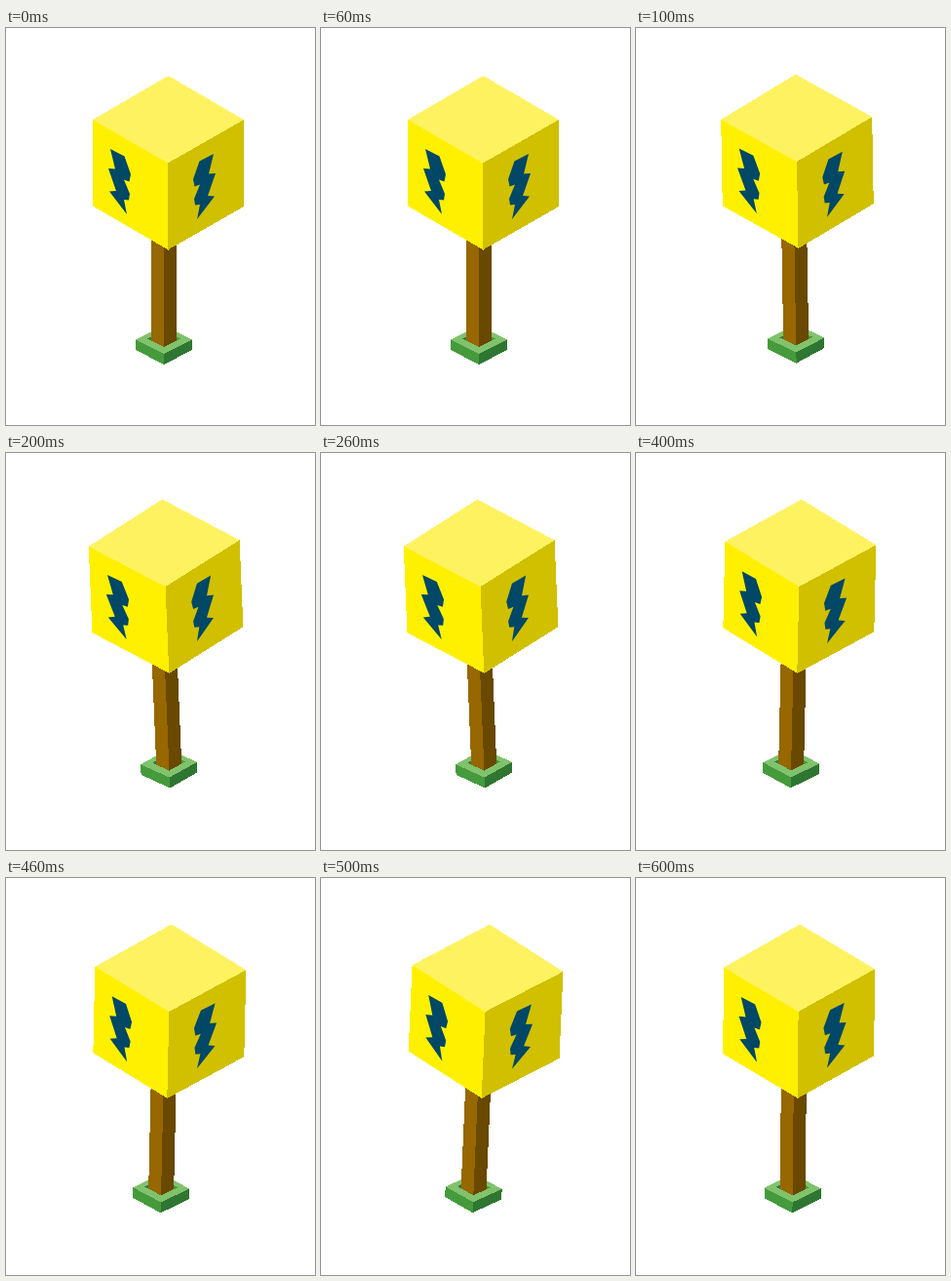
An HTML page for the animation above (0.7 s loop, 317 by 407 pixels).

```html
<!DOCTYPE html>
<html lang="en">
<head>
<meta charset="utf-8">
<title>Swaying block sign</title>
<style>
  html, body { margin: 0; width: 100%; height: 100%; overflow: hidden; background: #fff; }
  svg { display: block; width: 100vw; height: 100vh; }
</style>
</head>
<body>
<svg viewBox="0 0 317 407">
  <defs>
    <path id="bolt" d="M107 124L121.500 131.500L128 150L126.500 157.500L121 155.500L127 170L126 176.500L121 176L124 191L106 167.500L113 167L105 144L112 144.500Z"/>
  </defs>
  <g id="sign" shape-rendering="crispEdges">
    <g id="base">
      <path fill="#459b3c" d="M133 319.500L162 334V345L133 330Z"/>
      <path fill="#2f7632" d="M191 319.500L162 334V345L191 330Z"/>
      <path fill="#80c36c" d="M162 305L191 319.500L162 334L133 319.500Z"/>
      <path fill="#34784b" d="M162 310L145 318.500L162 327Z"/>
      <path fill="#459b3c" d="M162 310L179 318.500L162 327Z"/>
    </g>
    <g id="post">
      <path fill="#976700" d="M149 210H162.500V327L149 320.500Z"/>
      <path fill="#694800" d="M162 210H175V320.500L162 327Z"/>
    </g>
    <g id="cube">
      <path fill="#fff000" d="M89 94L166.500 138V227.500L89 182.500Z"/>
      <path fill="#d0c000" d="M244 94L166 138V227.500L244 183Z"/>
      <path fill="#fff260" d="M166.500 49L244 94L166 138.500L89 94Z"/>
      <g fill="#004866" shape-rendering="auto">
        <use href="#bolt"/>
        <use href="#bolt" transform="translate(320 5) scale(-1 1)"/>
      </g>
    </g>
  </g>
</svg>
<script>
  const STEP = 100;
  const PIVOT = "166 197";
  // Held poses of the sway, in degrees.
  const tilts = [0, -1, -2.4, -1.2, 1.3, 2.5, 0.6];
  const sign = document.getElementById("sign");

  function draw(time) {
    const tilt = tilts[Math.floor(time / STEP) % tilts.length];
    const lift = tilt ? -1.5 : 0;
    sign.setAttribute("transform", `translate(0 ${lift}) rotate(${tilt} ${PIVOT})`);
  }

  let start;
  function tick(now) {
    start ??= now;
    draw(now - start);
    requestAnimationFrame(tick);
  }

  draw(0);
  requestAnimationFrame(tick);
</script>
</body>
</html>
```
